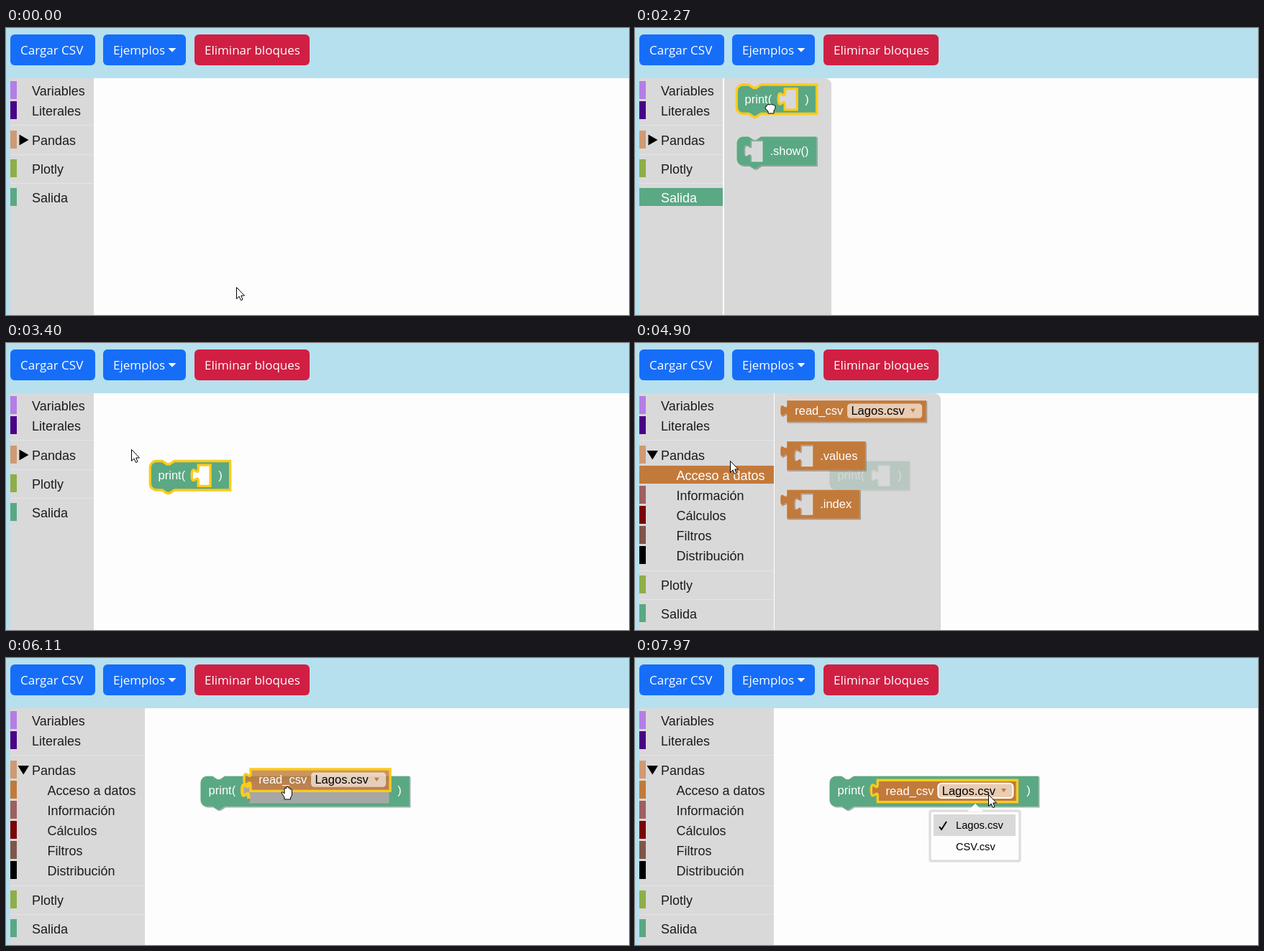
Write an HTML page that moves like this. It is 866 by 400 pixels and loops after 8000 ms.

```html
<!DOCTYPE html>
<html lang="es">
<head>
<meta charset="utf-8">
<style>
  html, body { margin: 0; width: 100%; height: 100%; overflow: hidden; background: #fdfdfd; }
  svg { display: block; font: 18px "Liberation Sans", sans-serif; }
  .block text { font-size: 14.67px; fill: #fff; }
  .block .value { fill: #000; }
  .button { font: 17px "Open Sans", sans-serif; fill: #fff; }
  .menu { font-size: 14.63px; }
</style>
</head>
<body>
<svg id="stage" width="866" height="400" viewBox="0 0 866 400"></svg>
<script>
const LOOP = 8000, ZOOM = 1.125;
const GREEN = '#5ba884', BROWN = '#c27a3b', YELLOW = '#fccb1c';
const SKY = '#b7e0ee', GRAY = '#d9d9d9', PAPER = '#fdfdfd';
const SOCKET = 'c0,-10 -8,8 -8,-7.5s8,2.5 8,-7.5';

// Moments at which the state changes, in ms
const AT = {
  salida: 1400, grabPrint: 2200, dragPrint: 2330, dropPrint: 2980, leavePrint: 3120,
  expand: 3850, acceso: 4500, overRead: 5200, grabRead: 5380, dragRead: 5480,
  preview: 5930, dropRead: 6450, overField: 6900, menu: 7580
};

const pointerPath = [
  [0, 320, 361], [350, 320, 361], [870, 303, 340], [1330, 76, 238], [1600, 76, 238],
  [2080, 188, 112], [2330, 188, 112], [2900, 247, 197.5], [3060, 247, 197.5],
  [3400, 174, 148], [3740, 66, 157], [4080, 66, 157], [4400, 112, 185], [4650, 114, 184],
  [4900, 132, 164], [5300, 262, 113], [5480, 262, 113], [5810, 294, 128],
  [6080, 391, 188], [6560, 391, 188], [7080, 488, 186], [7200, 488, 186],
  [7450, 491, 190], [LOOP, 491, 190]
];

function pointerAt(t) {
  const i = pointerPath.findIndex(key => key[0] > t);
  const [t0, x0, y0] = pointerPath[i - 1], [t1, x1, y1] = pointerPath[i];
  const p = (t - t0) / (t1 - t0), k = p * p * (3 - 2 * p);
  return [x0 + (x1 - x0) * k, y0 + (y1 - y0) * k];
}

const rect = (x, y, w, h, fill, extra = '') =>
  `<rect x="${x}" y="${y}" width="${w}" height="${h}" fill="${fill}" ${extra}/>`;
const text = (x, y, s, extra = '') => `<text x="${x}" y="${y}" ${extra}>${s}</text>`;
const path = (d, fill, extra = '') => `<path d="${d}" fill="${fill}" ${extra}/>`;

// Block outlines, in unscaled block units
const statement = (w, h) => `M0,8A8,8 0 0 1 8,0H15l6,4 3,0 6,-4H${w}V${h}` +
  `H30l-6,4-3,0-6,-4H8a8,8 0 0 1-8,-8z`;
const output = (w, h) => `M0,0H${w}V${h}H0V20${SOCKET}z`;
const hole = (x, w, h) => `M${x},5h${w}v${h}h${-w}V25${SOCKET}z`;

function block(x, y, outline, color, content, { selected, dragging } = {}) {
  const shadow = selected ? '' :
    path(outline, '#000', 'fill-opacity=".35" fill-rule="evenodd" transform="translate(1 1)"');
  const stroke = selected ? `stroke="${YELLOW}" stroke-width="3"` :
    'stroke="#fff" stroke-opacity=".25"';
  const alpha = dragging ? 'fill-opacity=".8"' : '';
  return `<g class="block" transform="translate(${x} ${y}) scale(${ZOOM})">` + shadow +
    path(outline, color, `fill-rule="evenodd" ${stroke} ${alpha}`) + content + '</g>';
}

function printBlock(x, y, { wide, marker, selected } = {}) {
  const [w, h, gap, gapH] = wide ? [258.7, 38, 173, 28] : [99, 36, 15, 26];
  const preview = marker ? path(hole(59.5, gap, gapH), '#000', 'fill-opacity=".34"') +
    path(`M59.5,28V25${SOCKET}v-4`, 'none', `stroke="${YELLOW}" stroke-width="4"`) : '';
  return block(x, y, statement(w, h) + hole(59.5, gap, gapH), GREEN,
    text(10, 23, 'print(') + text(wide ? 243.5 : 84.5, 23, ')') + preview, { selected });
}

function readBlock(x, y, state = {}) {
  const border = state.hover ? 'stroke="#fff" stroke-width="1.8"' : '';
  return block(x, y, output(172.5, 27), BROWN,
    text(10, 18, 'read_csv') +
    rect(74.7, 4, 92.5, 18, '#fff', `rx="4" fill-opacity=".62" ${border}`) +
    text(79.5, 18, 'Lagos.csv', 'class="value"') +
    path('M152.8,10.5h6l-3,4.5z', BROWN), state);
}

const memberBlock = (x, y, w, label, shape, color) =>
  block(x, y, shape(w, 36) + hole(17.5, 14.5, 26), color, text(41, 23, label));

function button(x, w, label, color) {
  return rect(x, 9, w, 43, color, 'rx="6"') + text(x + 14, 37, label, 'class="button"');
}

const header = rect(0, 0, 866, 70, SKY) + rect(0, 70, 6, 330, SKY) +
  button(6, 118, 'Cargar CSV', '#166ef8') + button(135, 115, 'Ejemplos', '#166ef8') +
  path('M225.5,28h11l-5.5,5.5z', '#fff') + button(262, 160, 'Eliminar bloques', '#d01f43');

function toolbox(width, expanded, selected) {
  const shift = expanded ? 141 : 0;
  const row = (y, label, color, indent = 36) => {
    const active = label === selected;
    return rect(6, y, active ? width - 6 : 9, 25, color) +
      text(indent, y + 20, label, `fill="${active ? '#fff' : '#1c1c1c'}"`);
  };
  const children = [
    ['Acceso a datos', BROWN], ['Información', '#a05f5f'], ['Cálculos', '#7c0404'],
    ['Filtros', '#80564a'], ['Distribución', '#000']
  ];
  return rect(6, 70, width - 6, 330, GRAY) +
    [135, 176 + shift, 216 + shift].map(y => rect(6, y, width - 6, 1, '#e4e4e4')).join('') +
    row(74, 'Variables', '#b57de6') + row(102, 'Literales', '#4b0386') +
    row(143, 'Pandas', '#d09a72') +
    path(expanded ? 'M16.5,150h15.5l-7.75,12.5z' : 'M18.5,148.5v15l13,-7.5z', '#000') +
    (expanded ? children.map(([s, c], i) => row(171 + 28 * i, s, c, 57.5)).join('') : '') +
    row(183 + shift, 'Plotly', '#8fae48') + row(223 + shift, 'Salida', GREEN);
}

const flyout = (x, right) =>
  path(`M${x},70H${right - 9}a9,9 0 0 1 9,9V400H${x}z`, '#d0d0d0', 'fill-opacity=".8"');

function menu(opacity) {
  return `<g class="menu" opacity="${opacity}">` +
    rect(408, 211, 129, 74, '#e8e8e8', 'rx="4"') +
    rect(410.5, 213.5, 124, 69, PAPER, `rx="2" stroke="${GRAY}" stroke-width="2"`) +
    path('M462,214l11,-11 11,11z', PAPER) + rect(415, 218, 114, 30, GRAY) +
    path('M423,235l3,4 7,-11', 'none', 'stroke="#000" stroke-width="2"') +
    text(446, 238, 'Lagos.csv') + text(446, 268, 'CSV.csv') + '</g>';
}

const cursors = {
  arrow: 'M.5,.5V16.5L4,13 6.5,18.5 9,17.5 6.8,12H11.5Z',
  fist: 'M-5,-4q2,-3 4,-1q2,-2 4,0q3,-1 4,2q1,3 -2,6v4h-8v-3q-4,-3 -4,-5q0,-2 2,-2z',
  hand: 'M-4,9v-3l-4,-6q0,-2 2,-1l2,2v-7q1,-2 2.5,0v-2q1.5,-2 3,0v1q2,-1 2.5,1v1' +
    'q2,-1 2.5,1v7l-2,4v2z'
};

function cursorKind(t) {
  if (t >= AT.grabPrint && t < AT.dropPrint) return 'fist';
  if (t >= 2050 && t < AT.leavePrint) return 'hand';
  return t >= AT.overRead && t < 6660 ? 'hand' : 'arrow';
}

function draw(t) {
  const [px, py] = pointerAt(t);
  const expanded = t >= AT.expand;
  const width = expanded ? 193 : 122;
  let selected = '', workspace = '', panel = '', floating = '';

  if (t >= AT.salida && t < AT.dragPrint) {
    selected = 'Salida';
    panel = flyout(124, 273) + printBlock(141.3, 79, { selected: t >= AT.grabPrint }) +
      memberBlock(141.3, 151.3, 99, '.show()', statement, GREEN);
  }
  if (t >= AT.acceso && t < AT.dragRead) {
    selected = 'Acceso a datos';
    panel = flyout(194, 425) + readBlock(211, 80, { selected: t >= AT.grabRead }) +
      memberBlock(211, 137, 97.5, '.values', output, BROWN) +
      memberBlock(211, 204.5, 90.5, '.index', output, BROWN);
  }

  if (t >= AT.dragPrint && t < AT.dropPrint) {
    floating = printBlock(px - 46.7, py - 33, { selected: true });
  } else if (t >= AT.dropPrint) {
    workspace = printBlock(expanded ? 270.3 : 200.3, 164.5, {
      selected: !expanded, wide: t >= AT.preview,
      marker: t >= AT.preview && t < AT.dropRead
    });
  }

  if (t >= AT.dragRead && t < AT.dropRead) {
    floating = readBlock(px - 51, py - 33, { selected: true, dragging: true });
  } else if (t >= AT.dropRead) {
    workspace += readBlock(337.3, 170.3, { selected: true, hover: t >= AT.overField });
  }
  if (t >= AT.menu) floating = menu(Math.min(1, (t - AT.menu) / 200));

  stage.innerHTML = rect(0, 0, 866, 400, PAPER) + workspace + panel +
    toolbox(width, expanded, selected) + header + floating +
    path(cursors[cursorKind(t)], '#fff', `stroke="#000" transform="translate(${px} ${py})"`);
}

const stage = document.getElementById('stage');
const start = performance.now();
function tick() {
  draw((performance.now() - start) % LOOP);
  requestAnimationFrame(tick);
}
tick();
</script>
</body>
</html>
```
